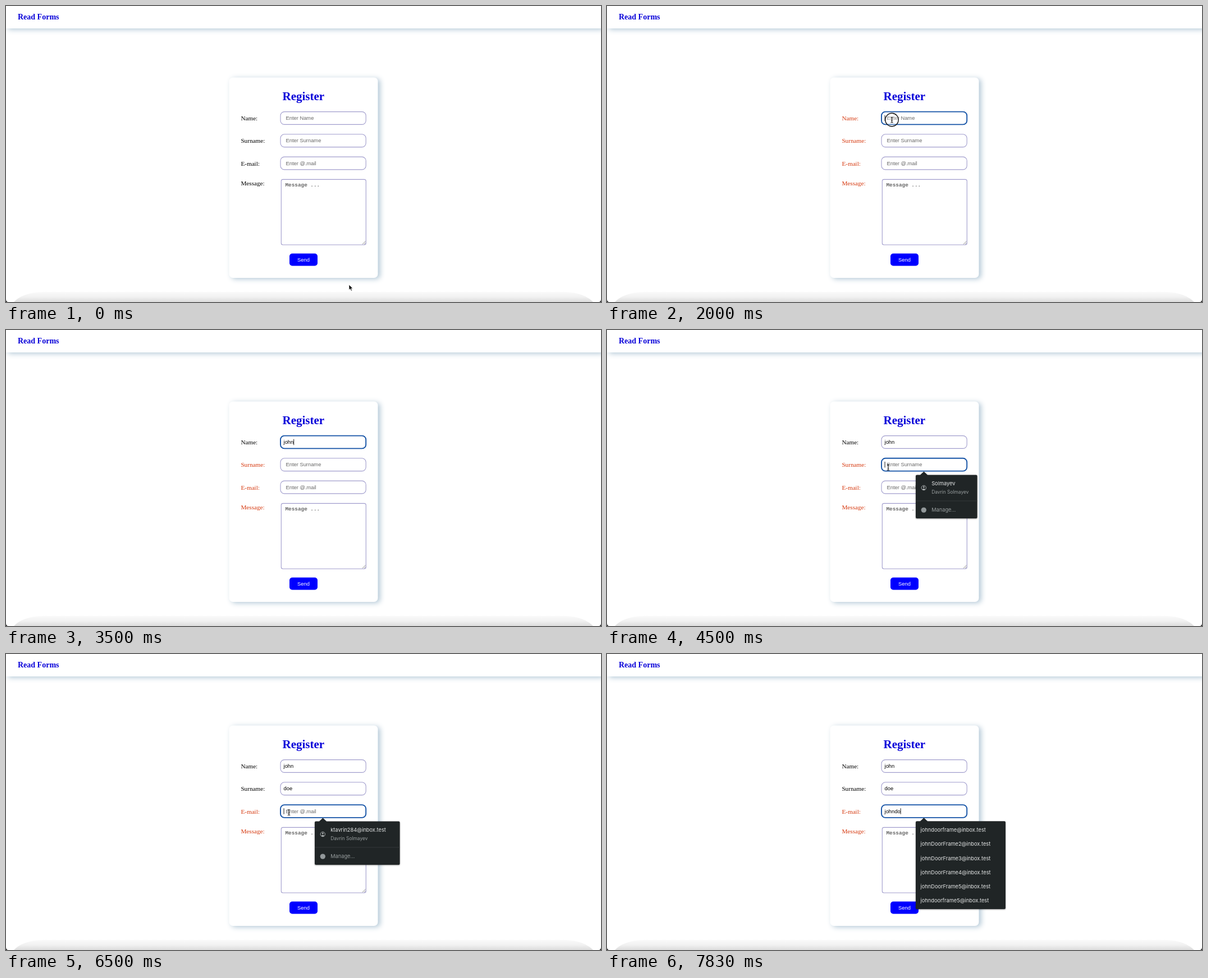
Recreate the animation shown at these times as an HTML page. Size 1060x528 px, loop 8000 ms.

```html
<!DOCTYPE html>
<html lang="en">
<head>
<meta charset="utf-8">
<title>Register form</title>
<style>
  html, body { margin: 0; width: 100%; height: 100%; overflow: hidden; background: #fff; }
  svg { display: block; width: 1060px; height: 528px; }
  text { white-space: pre; }
  .serif { font: 11.2px "Liberation Serif", Times, serif; }
  .head { font: bold 14px "Liberation Serif", Times, serif; fill: #0700d9; }
  .title { font: bold 21px "Liberation Serif", Times, serif; fill: #0700d9; text-anchor: middle; }
  .sans { font: 9.35px "Liberation Sans", Arial, sans-serif; }
  .mono { font: bold 9.35px "Liberation Mono", "Courier New", monospace; }
  .hint { fill: #686868; }
  .raised { fill: #fff; filter: drop-shadow(4px 2px 5px #b2c7d6); }
  .box { fill: #fff; stroke: #a19dcd; stroke-width: 1.1; }
  .box.focus { stroke: #1553a6; stroke-width: 1.9; }
  .panel { fill: #202526; filter: drop-shadow(0 1px 1px #0006); }
  .ui { font: 9.25px Inter, Roboto, sans-serif; fill: #e6e8e8; }
  .dim { fill: #989e9f; }
  .small { font-size: 8.4px; }
</style>
</head>
<body>
<svg id="stage" viewBox="0 0 1060 528">
  <defs>
    <linearGradient id="shade" x1="0" y1="0" x2="0" y2="1">
      <stop offset="0" stop-color="#fafafa"/>
      <stop offset=".5" stop-color="#f1f1f1"/>
      <stop offset="1" stop-color="#dcdcdc"/>
    </linearGradient>
  </defs>
  <rect width="1060" height="528" fill="#fff"/>
  <rect class="raised" width="1060" height="40"/>
  <text class="head" x="21" y="23.5">Read Forms</text>
  <path d="M14 528Q30 511 66 510H994Q1030 511 1046 528Z" fill="url(#shade)"/>
  <path d="M0 523Q0 528 4 528H0ZM1060 523Q1060 528 1056 528H1060Z"/>
  <rect class="raised" x="397.5" y="127.5" width="265" height="357.5" rx="7"/>
  <text class="title" x="529.8" y="167.5">Register</text>
  <g id="form"></g>
  <rect class="box" x="490.3" y="309.4" width="151" height="116.6" rx="3"/>
  <text class="mono hint" x="497.5" y="322">Message ...</text>
  <path d="M635 425L640.5 419.5M638 425L640.5 422.5" stroke="#777" stroke-width=".8"/>
  <rect x="505" y="441.5" width="50" height="22" rx="5" fill="#00f"/>
  <text class="sans" x="519" y="455.7" fill="#fff">Send</text>
  <rect id="caret" width=".9" height="10.5"/>
  <g id="popups"></g>
  <g id="cursor">
    <circle r="11.7" fill="#fff3" stroke="#111" stroke-width="1.4"/>
    <path d="M0 0V9.6L2.2 7.5L3.8 11.2L5.5 10.4L3.9 6.9H7Z" stroke="#fff" stroke-width=".8"/>
    <path d="M-2.2 -5Q0 -5 0 -3.5Q0 -5 2.2 -5M0 -4V4M-2.2 5Q0 5 0 3.5Q0 5 2.2 5M-1.3 1.3H1.3"
      fill="none" stroke="#222" stroke-width="1.1"/>
  </g>
</svg>
<script>
const LOOP = 8000, RATE = 6;
const $ = id => document.getElementById(id);

function add(parent, tag, attrs, text = '') {
  const el = document.createElementNS('http://www.w3.org/2000/svg', tag);
  for (const k in attrs) el.setAttribute(k, attrs[k]);
  el.textContent = text;
  return parent.appendChild(el);
}
const write = (parent, cls, x, y, text) => add(parent, 'text', { class: cls, x, y }, text);
const show = (el, on) => el.setAttribute('visibility', on ? 'visible' : 'hidden');

// Times are in steps of 1/6 s; "typed" is the step of the first letter.
const fields = [
  { label: 'Name:', hint: 'Enter Name', y: 200, value: 'john', focus: 12, typed: 17, blur: 25, valid: true },
  { label: 'Surname:', hint: 'Enter Surname', y: 240.2, value: 'doe', focus: 25, typed: 28, blur: 37, valid: true },
  { label: 'E-mail:', hint: 'Enter @.mail', y: 280.5, value: 'johndo', focus: 37, typed: 42, blur: 48 }
];
const SUBMIT = 7;
const presses = [6, 12, 25, 37];
const hides = [[17, 22], [28, 33], [42, 48]];
const path = [
  [0, 611, 497], [1, 611, 497], [5, 534, 453], [8, 534, 453], [12, 507.5, 203],
  [22, 507, 206], [25, 501, 245], [33, 501, 246], [36, 504, 282.5], [48, 504, 282.5]
];

for (const f of fields) {
  f.name = write($('form'), 'serif', 418.4, f.y + 4, f.label);
  f.box = add($('form'), 'rect', { class: 'box', x: 489, y: f.y - 11.4, width: 152.2, height: 22.8, rx: 7 });
  f.ghost = write($('form'), 'sans hint', 498.5, f.y + 3.2, f.hint);
  f.text = write($('form'), 'sans', 494.6, f.y + 3.2, '');
}
const message = write($('form'), 'serif', 418.4, 319.6, 'Message:');

function panel(y, width, height, from, to) {
  const g = add($('popups'), 'g', { transform: `translate(550 ${y})` });
  add(g, 'path', {
    class: 'panel',
    d: `M2 0H8L14.5 -6L21 0H${width - 2}q2 0 2 2V${height - 2}q0 2 -2 2H2q-2 0 -2 -2V2q0 -2 2 -2Z`
  });
  return { g, from, to };
}

function suggestion(y, width, from, to, main) {
  const p = panel(y, width, 77.6, from, to), g = p.g;
  add(g, 'circle', { cx: 14.3, cy: 23, r: 4.2, fill: 'none', stroke: '#a8adae' });
  add(g, 'circle', { cx: 14.3, cy: 21.6, r: 1.5, fill: '#a8adae' });
  add(g, 'path', { d: 'M11.3 25.8Q14.3 22.8 17.3 25.8L14.3 27.4Z', fill: '#a8adae' });
  write(g, 'ui', 28.2, 18.8, main);
  write(g, 'ui dim small', 28.2, 33.6, 'Davrin Solmayev');
  add(g, 'rect', { y: 46, width, height: .8, fill: '#383d3e' });
  add(g, 'circle', { cx: 14.3, cy: 62.6, r: 4.7, fill: '#92989a' });
  write(g, 'ui dim', 28.2, 65.8, 'Manage...');
  return p;
}

const list = panel(298.3, 160, 156.7, 42, 48);
['johndoorframe', 'johnDoorFrame2', 'johnDoorFrame3', 'johnDoorFrame4', 'johnDoorFrame5', 'johndoorframe5']
  .forEach((user, i) => write(list.g, 'ui', 8.5, 19 + i * 25.2, user + '@inbox.test'));
const popups = [
  suggestion(218.3, 109.6, 13, 17, 'Davrin'),
  suggestion(258.5, 109.6, 26, 28, 'Solmayev'),
  suggestion(298.5, 151.6, 38, 42, 'ktavrin284@inbox.test'),
  list
];

function pointAt(n) {
  const i = path.findIndex(k => k[0] > n);
  const [s0, x0, y0] = path[i - 1], [s1, x1, y1] = path[i];
  const u = (n - s0) / (s1 - s0), e = u * u * (3 - 2 * u);
  return [x0 + (x1 - x0) * e, y0 + (y1 - y0) * e];
}

function drawCursor(n) {
  const [x, y] = pointAt(n);
  const overText = x > 489 && x < 641 &&
    (fields.some(f => Math.abs(y - f.y) < 11.5) || (y > 309 && y < 426));
  const [ring, arrow, beam] = $('cursor').children;
  const seen = !hides.some(([a, b]) => n >= a && n < b);
  $('cursor').setAttribute('transform', `translate(${x} ${y})`);
  show(ring, seen && presses.includes(n));
  show(arrow, seen && !overText);
  show(beam, seen && overText);
}

function draw(n) {
  const sent = n >= SUBMIT;
  const ink = bad => bad ? '#d63a10' : '#000';
  show($('caret'), false);
  for (const f of fields) {
    const count = Math.min(f.value.length, Math.max(0, n - f.typed + 1));
    const active = n >= f.focus && n < f.blur;
    f.text.textContent = f.value.slice(0, count);
    show(f.ghost, !count);
    f.name.setAttribute('fill', ink(sent && !(f.valid && count)));
    f.box.setAttribute('class', active ? 'box focus' : 'box');
    if (active) {
      const last = count ? f.typed + count - 1 : f.focus;
      $('caret').setAttribute('x', 494.6 + (count ? f.text.getComputedTextLength() : 0));
      $('caret').setAttribute('y', f.y - 5.3);
      show($('caret'), (n - last) % RATE < RATE / 2);
    }
  }
  message.setAttribute('fill', ink(sent));
  for (const p of popups) show(p.g, n >= p.from && n < p.to);
  drawCursor(n);
}

const start = performance.now();
function tick() {
  const t = (performance.now() - start) % LOOP;
  draw(Math.min(47, Math.floor((t + 5) * RATE / 1000)));
  requestAnimationFrame(tick);
}
tick();
</script>
</body>
</html>
```
